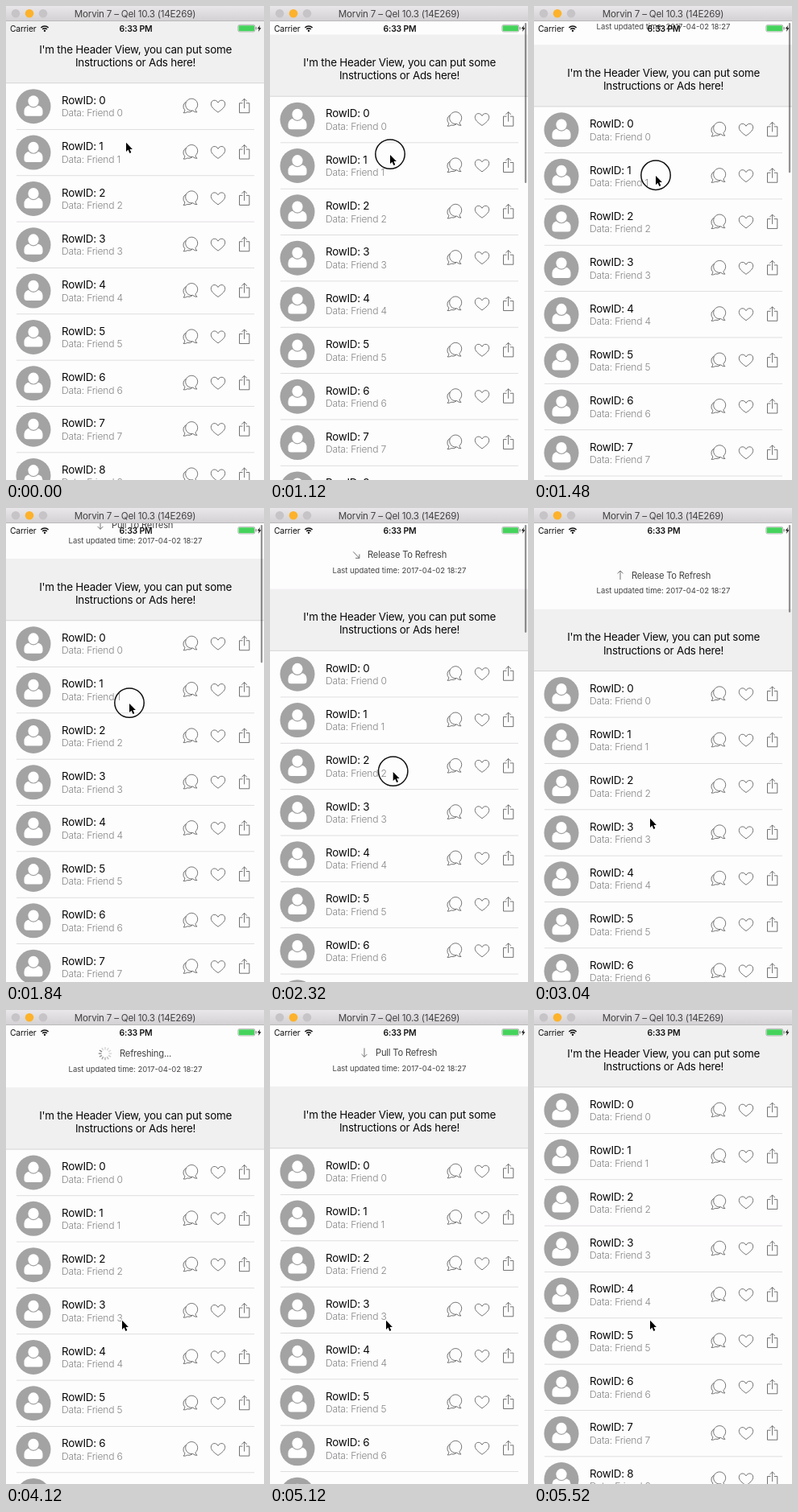
These frames come from a looping animation (320x589 px, 6040 ms). An HTML page with a canvas:

```html
<!DOCTYPE html>
<html lang="en">
<head>
<meta charset="utf-8">
<title>Pull to refresh list</title>
<style>
html, body { margin: 0; width: 100%; height: 100%; overflow: hidden; background: #fefdfe; }
canvas { display: block; }
</style>
</head>
<body>
<canvas id="stage" width="320" height="589"></canvas>
<script>
const ctx = document.getElementById('stage').getContext('2d');
const LOOP = 6040, ROW = 57.35, TAU = Math.PI * 2;
const FLIP = 2260, RELEASE = 3050, DONE = 5090, REST = 77.3;

// time, pointer x, pointer y, list offset
const drag = [
  [0, 149, 169, 0], [560, 149, 153, 0], [720, 149, 153, 0], [1120, 149, 184, 16.4],
  [1840, 153, 242, 44], [2320, 152.7, 327, 81.5], [2960, 144, 385, 106.7], [LOOP, 144, 385, 106.7]
];

const clamp = v => Math.max(0, Math.min(1, v));
const ease = v => { v = clamp(v); return v * v * (3 - 2 * v); };

// Monotone cubic interpolation of one column of the drag table
function sample(t, col) {
  const slope = i => {
    const a = drag[i], b = drag[i + 1];
    return a && b ? (b[col] - a[col]) / (b[0] - a[0]) : 0;
  };
  const tangent = i => {
    const a = slope(i - 1), b = slope(i);
    return a * b > 0 ? 2 * a * b / (a + b) : 0;
  };
  let i = 0;
  while (i < drag.length - 2 && t >= drag[i + 1][0]) i++;
  const a = drag[i], b = drag[i + 1], h = b[0] - a[0], u = (t - a[0]) / h, v = 1 - u;
  return a[col] * v * v * (1 + 2 * u) + b[col] * u * u * (3 - 2 * u)
    + h * u * v * (tangent(i) * v - tangent(i + 1) * u);
}

function offsetAt(t) {
  if (t < RELEASE) return sample(t, 3);
  const pulled = sample(RELEASE, 3);
  if (t < DONE) return pulled + (REST - pulled) * ease((t - RELEASE) / 370);
  return REST * (1 - ease((t - DONE) / 410));
}

function text(str, x, y, size, color, { align = 'left', weight = 400, track = -0.018 } = {}) {
  ctx.font = `${weight} ${size}px Inter, sans-serif`;
  ctx.letterSpacing = `${track * size}px`;
  ctx.textAlign = align;
  ctx.fillStyle = color;
  ctx.fillText(str, x, y);
}

function rect(x, y, w, h, color) {
  ctx.fillStyle = color;
  ctx.fillRect(x, y, w, h);
}

function disc(x, y, r, color) {
  ctx.fillStyle = color;
  ctx.beginPath();
  ctx.arc(x, y, r, 0, TAU);
  ctx.fill();
}

function round(x, y, w, h, r, color) {
  ctx.fillStyle = color;
  ctx.beginPath();
  ctx.roundRect(x, y, w, h, r);
  ctx.fill();
}

function line(path, color = '#626262', width = 0.9) {
  ctx.strokeStyle = color;
  ctx.lineWidth = width;
  ctx.stroke(new Path2D(path));
}

function at(x, y, draw) {
  ctx.save();
  ctx.translate(x, y);
  draw();
  ctx.restore();
}

function avatar() {
  const gray = '#a4a3a4';
  disc(0, 0, 21.5, gray);
  round(-11.5, -1.3, 23, 13.3, [7, 7, 3.5, 3.5], '#fff');
  ctx.beginPath();
  ctx.ellipse(0, -6.4, 6.6, 7, 0, 0, TAU);
  ctx.strokeStyle = gray;
  ctx.lineWidth = 2.4;
  ctx.stroke();
  ctx.fillStyle = '#fff';
  ctx.fill();
}

function icons() {
  // Chat
  line('M223.2 -5.4 A6.3 6.3 0 0 0 221.8 4.6 Q221.8 6.8 220 8 Q223 8.4 224.8 7 Q228.5 8 231 5.6');
  line('M237 7.2 Q235.1 6 235 3.7 A7.5 7.5 0 1 0 231.7 5.3 Q234 7.6 237 7.2 Z');
  // Heart
  line('M263 7.4 C258 3.8 254.3 0.8 254.3 -2.9 C254.3 -8.2 260.7 -9.2 263 -4.6 C265.3 -9.2 271.7 -8.2 271.7 -2.9 C271.7 0.8 268 3.8 263 7.4 Z');
  // Share
  line('M293.5 -4 H289.5 V8 H301.8 V-4 H297.8 M295.6 2.5 V-9.5 M292.4 -6.3 L295.6 -9.5 L298.8 -6.3');
}

function row(i, y) {
  at(0, y, () => {
    at(34, 28.7, avatar);
    text(`RowID: ${i}`, 69, 26, 13.4, '#080808');
    text(`Data: Friend ${i}`, 69, 41.4, 12.1, '#858485', { weight: 300 });
    at(0, 28.7, icons);
    rect(13, ROW - 0.4, 295, 0.9, '#dcdbdc');
  });
}

function spinner(t) {
  const lead = Math.floor(t / 1000 * 12 + 9) % 12;
  for (let i = 0; i < 12; i++) {
    const age = (lead - i + 12) % 12;
    at(123, -4, () => {
      ctx.rotate(i * TAU / 12);
      line('M0 -4.6 V-8.2', `rgba(110,110,110,${Math.max(0.28, 0.9 - age * 0.09)})`, 1.4);
    });
  }
}

function refreshLabel(t, y) {
  const color = '#434243';
  const busy = t >= RELEASE && t < DONE, ready = t >= FLIP && t < RELEASE;
  at(0, y, () => {
    if (busy) {
      spinner(t);
      text('Refreshing...', 141, 0, 11.2, color);
    } else {
      at(ready ? 107 : 117, -4, () => {
        if (ready) ctx.rotate(-Math.PI * clamp((t - FLIP) / 250));
        line('M0 -5.5 V5.5 M-3.4 2.1 L0 5.5 L3.4 2.1', '#666');
      });
      text(ready ? 'Release To Refresh' : 'Pull To Refresh', ready ? 121 : 131, 0, 11.2, color);
    }
    text('Last updated time: 2017-04-02 18:27', 160.5, 18.7, 9.5, color, { align: 'center', track: 0 });
  });
}

function statusBar() {
  text('Carrier', 5, 31.5, 10.3, '#111');
  at(48, 31.4, () => {
    line('M-4.6 -4.4 A6.5 6.5 0 0 1 4.6 -4.4 M-2.8 -2.4 A4 4 0 0 1 2.8 -2.4', '#111', 1.5);
    disc(0, -0.6, 1.2, '#111');
  });
  text('6:33 PM', 161, 31.5, 10.4, '#111', { align: 'center', weight: 600 });
  ctx.strokeStyle = '#8d8c8d';
  ctx.lineWidth = 0.6;
  ctx.beginPath();
  ctx.roundRect(287.8, 23.4, 21, 8.6, 2);
  ctx.stroke();
  round(288.6, 24.2, 19.4, 7, 1, '#45d35c');
  round(309.5, 26, 1.3, 3.4, 0.6, '#8d8c8d');
  ctx.fillStyle = '#111';
  ctx.fill(new Path2D('M315 24 L311.8 28.3 H313.8 L313 32 L316.4 27.3 H314.3 Z'));
}

function titleBar() {
  const shade = ctx.createLinearGradient(0, 0, 0, 19);
  shade.addColorStop(0, '#e9e7e9');
  shade.addColorStop(1, '#d2d0d2');
  rect(0, 0, 320, 19, shade);
  rect(0, 18.2, 320, 0.8, '#b6b4b6');
  ['#c6c4c6', '#fdb22b', '#c6c4c6'].forEach((color, i) => disc(12 + 17 * i, 9.3, 5.3, color));
  text('Morvin 7 – Qel 10.3 (14E269)', 160, 13.5, 11.6, '#434243', { align: 'center' });
}

function pointer(t) {
  at(sample(t, 1), sample(t, 2), () => {
    if (t >= 700 && t < RELEASE - 20) {
      ctx.beginPath();
      ctx.arc(0, 0, 18.2, 0, TAU);
      ctx.strokeStyle = '#111';
      ctx.lineWidth = 1.5;
      ctx.stroke();
    }
    const arrow = 'M0 0.8 V12 L2.5 9.6 L4.4 13.9 L6.3 13.1 L4.5 8.9 H7.9 Z';
    line(arrow, '#fff', 1.5);
    ctx.fillStyle = '#000';
    ctx.fill(new Path2D(arrow));
  });
}

function draw(t) {
  const offset = offsetAt(t);
  rect(0, 0, 320, 589, '#fefdfe');
  refreshLabel(t, offset - 19.2);
  at(0, offset, () => {
    rect(0, 19, 320, 77, '#f1f0f1');
    rect(0, 95.3, 320, 0.9, '#d3d2d3');
    text("I'm the Header View, you can put some", 160.6, 58.5, 13.4, '#080808', { align: 'center' });
    text('Instructions or Ads here!', 160.6, 74.8, 13.4, '#080808', { align: 'center' });
    for (let i = 0; i < 9; i++) row(i, 96 + i * ROW);
  });
  const shown = t < 720 ? 0 : 1 - clamp((t - 3480) / 280);
  if (shown) round(315.9, 21, 2.3, 215.5 - offset, 1.1, `rgba(0,0,0,${0.42 * shown})`);
  statusBar();
  titleBar();
  pointer(t);
}

function tick() {
  draw(performance.now() % LOOP);
  requestAnimationFrame(tick);
}
tick();
</script>
</body>
</html>
```
